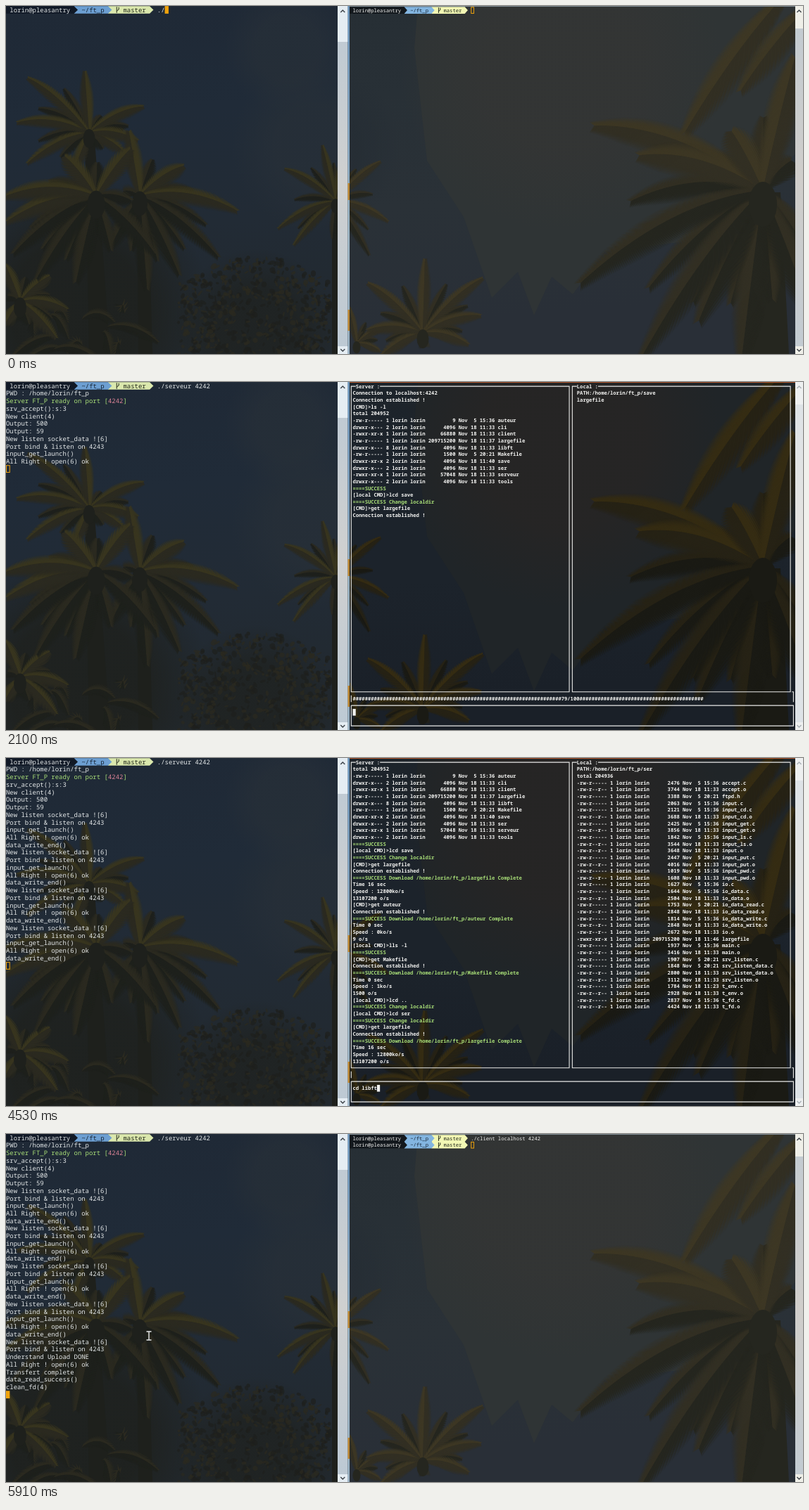
Animation, 1132 px wide and 495 px high, one loop 5.94 s. Source, as an HTML page with a canvas:

```html
<!DOCTYPE html>
<html lang="en">
<head>
<meta charset="utf-8">
<title>ft_p session</title>
<style>
html, body { margin: 0; width: 100%; height: 100%; overflow: hidden; background: #20282f; }
canvas { display: block; width: 1132px; height: 495px; }
</style>
</head>
<body>
<canvas id="stage" width="1132" height="495"></canvas>
<script>
const W = 1132, H = 495, LOOP = 5940, SPLIT = 488;
const USER = 'lorin', HOST = 'pleasantry', HOME = `/home/${USER}/ft_p`;
const GREEN = '#a9df78', ORANGE = '#f0a30c', PALE = '#e4e8e9', WHITE = '#f4f4f2';
const ctx = document.getElementById('stage').getContext('2d');

// ---------- scenery ----------

function rng(seed) {
  return () => (seed = (seed * 16807) % 2147483647) / 2147483647;
}

function frond(g, [upper, lower], x, y, tx, ty, lift, w) {
  const cx = (x + tx) / 2, cy = (y + ty) / 2 - lift;
  const n = Math.ceil(Math.hypot(tx - x, ty - y) / 2);
  for (let i = 1; i <= n; i++) {
    const t = i / n, u = 1 - t;
    const px = u * u * x + 2 * u * t * cx + t * t * tx;
    const py = u * u * y + 2 * u * t * cy + t * t * ty;
    const dx = u * (cx - x) + t * (tx - cx), dy = u * (cy - y) + t * (ty - cy);
    const a = Math.atan2(dy, dx), len = w * (0.3 + 0.7 * Math.sin(Math.PI * Math.pow(t, 0.85)));
    const ox = Math.cos(a) * 2.4, oy = Math.sin(a) * 2.4;
    for (const s of [-1, 1]) {
      const b = a + s * 0.7;
      g.fillStyle = s * dx < 0 ? upper : lower;
      g.beginPath();
      g.moveTo(px - ox, py - oy);
      g.lineTo(px + ox, py + oy);
      g.lineTo(px + Math.cos(b) * len, py + Math.sin(b) * len + len * 0.2);
      g.fill();
    }
  }
}

// tips run around the crown; shorter shaded fronds fill the gaps between them
function palm(g, pal, x, y, w, tips) {
  const shade = [pal.mid, pal.dark], sun = [pal.light, pal.mid];
  const n = tips.length;
  const lift = tx => Math.abs(tx - x) * 0.2;
  for (let i = 0; i < n; i += 2) {
    const mx = (tips[i] + tips[(i + 2) % n]) / 2, my = (tips[i + 1] + tips[(i + 3) % n]) / 2;
    const tx = x + (mx - x) * 0.75, ty = y + (my - y) * 0.75;
    frond(g, shade, x, y, tx, ty, lift(tx), w * 0.8);
  }
  for (let i = 0; i < n; i += 2) {
    const [tx, ty] = [tips[i], tips[i + 1]];
    frond(g, ty > y + 60 ? shade : sun, x, y, tx, ty, lift(tx), w);
  }
  g.fillStyle = pal.dark;
  g.beginPath();
  g.ellipse(x, y + w * 0.5, w * 0.5, w * 0.8, 0, 0, 7);
  g.fill();
}

function glow(g, x, y, r, color) {
  const grad = g.createRadialGradient(x, y, 0, x, y, r);
  grad.addColorStop(0, color);
  grad.addColorStop(0.5, color);
  grad.addColorStop(1, color.slice(0, 7) + '00');
  g.fillStyle = grad;
  g.fillRect(x - r, y - r, 2 * r, 2 * r);
}

function shape(g, color, points) {
  g.fillStyle = color;
  g.beginPath();
  for (let i = 0; i < points.length; i += 2) g.lineTo(points[i], points[i + 1]);
  g.fill();
}

function scene(pal) {
  const c = document.createElement('canvas');
  c.width = W;
  c.height = H;
  const g = c.getContext('2d'), rand = rng(42);
  const sky = g.createLinearGradient(0, 0, 40, H);
  pal.sky.forEach((col, i) => sky.addColorStop(i / (pal.sky.length - 1), col));
  g.fillStyle = sky;
  g.fillRect(0, 0, W, H);
  shape(g, pal.cloud, [585, 0, 580, 60, 598, 220, 650, 300, 690, 415, 727, 378, 750, 440, 775, 385,
    805, 410, 850, 350, 1000, 330, W, 200, W, 0]);
  glow(g, 790, 90, 230, pal.glow);
  glow(g, 400, 60, 90, pal.haze);
  glow(g, 440, 200, 120, pal.haze);

  // undergrowth and far trees
  glow(g, 100, 430, 190, pal.dark + 'd0');
  glow(g, 355, 460, 115, pal.dark + 'a0');
  for (let i = 0; i < 620; i++) {
    const x = 245 + rand() * 215, top = 395 - 40 * Math.sin((x - 245) / 70);
    const y = top + rand() * (500 - top);
    g.fillStyle = rand() < 0.5 ? pal.mid : pal.dark;
    g.globalAlpha = 0.7;
    g.beginPath();
    g.ellipse(x, y, 1 + rand() * 4, 1 + rand() * 3, rand() * 3, 0, 7);
    g.fill();
  }
  g.globalAlpha = 1;

  // trunks
  shape(g, pal.dark, [463, 285, 471, 285, 471, H, 463, H]);
  shape(g, pal.dark, [1062, 265, 1100, 265, 1112, H, 1050, H]);
  shape(g, pal.dark, [112, 190, 126, 190, 148, H, 118, H]);
  shape(g, pal.dark, [186, 280, 202, 280, 208, H, 188, H]);

  for (let i = 0; i < 14; i++) {
    const x = rand() * 230, y = 400 + rand() * 90;
    frond(g, [pal.mid, pal.dark], x, y, x + (rand() - 0.5) * 150, y + rand() * 50 - 15, 20, 15);
  }
  palm(g, pal, 20, 420, 18, [0, 370, 60, 385, 85, 430, 70, 470, 0, 450]);
  palm(g, pal, 118, 180, 17, [112, 95, 165, 205, 193, 143, 185, 190, 100, 225, 32, 222, 18, 165, 33, 103]);
  palm(g, pal, 190, 270, 22, [175, 180, 250, 228, 326, 290, 300, 355, 245, 380, 200, 400, 150, 340]);
  palm(g, pal, 128, 270, 25, [85, 215, 175, 205, 210, 350, 100, 390, 45, 385, 12, 350, 3, 305, 0, 270]);
  palm(g, pal, 468, 278, 13, [450, 200, 480, 215, 530, 222, 541, 305, 515, 352, 410, 338, 388, 315, 398, 232]);
  palm(g, pal, 498, 480, 11, [488, 430, 540, 455, 530, 490]);
  palm(g, pal, 592, 465, 17, [595, 362, 675, 388, 672, 440, 655, 480, 535, 495, 515, 460, 516, 395]);
  frond(g, [pal.light, pal.mid], 1110, -20, 965, 178, 22, 40);
  frond(g, [pal.light, pal.mid], 1150, -10, 1045, 118, 15, 34);
  palm(g, pal, 1075, 262, 40, [838, 170, 902, 212, 1032, 180, 1120, 75, 1132, 340, 1140, 430,
    1045, 500, 985, 445, 905, 495, 818, 392]);
  return c;
}

const leftView = scene({
  sky: ['#1f2936', '#202b38', '#222b35', '#22292f'], cloud: '#222b35',
  light: '#38351f', mid: '#2b2a20', dark: '#1e201c', glow: '#262e35ff', haze: '#283038a0'
});
const idleView = scene({
  sky: ['#262e34', '#283036', '#2a3137', '#292f37'], cloud: '#2f3435',
  light: '#3d3724', mid: '#322f23', dark: '#25261f', glow: '#343534c0', haze: '#232b3380'
});
const activeView = scene({
  sky: ['#1d242a', '#1c232b', '#1c232b', '#1a2028'], cloud: '#202528',
  light: '#352c13', mid: '#262215', dark: '#1a1a14', glow: '#272524d0', haze: '#1c232c80'
});

// ---------- directory listings ----------

const pad = (s, n) => String(s).padStart(n);
const entry = (perm, links, size, day, time, name) =>
  `${perm} ${links} ${USER} ${USER} ${pad(size, 9)} Nov ${pad(day, 2)} ${time} ${name}`;

const FILE = '-rw-r-----', DIR = 'drwxr-x---', OPEN = 'drwxr-xr-x', EXE = '-rwxr-xr-x';
const rootList = saved => [
  'total 204952',
  entry(FILE, 1, 9, 5, '15:36', 'auteur'),
  entry(DIR, 2, 4096, 18, '11:33', 'cli'),
  entry(EXE, 1, 66880, 18, '11:33', 'client'),
  entry(FILE, 1, 209715200, 18, '11:37', 'largefile'),
  entry(DIR, 8, 4096, 18, '11:33', 'libft'),
  entry(FILE, 1, 1500, 5, '20:21', 'Makefile'),
  entry(OPEN, 2, 4096, 18, saved, 'save'),
  entry(DIR, 2, 4096, 18, '11:33', 'ser'),
  entry(EXE, 1, 57048, 18, '11:33', 'serveur'),
  entry(DIR, 2, 4096, 18, '11:33', 'tools')
];
const names = rootList('').slice(1).map(l => l.split(' ').pop());

const saveList = more => [
  'total 204804',
  entry(EXE, 1, 9, 18, '11:45', 'auteur'),
  entry(EXE, 1, 209715200, 18, '11:45', 'largefile')
].concat(more ? entry(EXE, 1, 1500, 18, '11:45', 'Makefile') : []);

// objects default to 18 11:33, sources to 5 15:36
const SER = `accept.c 2476,accept.o 3744,ftpd.h 3388 5 20:21,input.c 2063,input_cd.c 2121,
input_cd.o 3688,input_get.c 2425,input_get.o 3856,input_ls.c 1842,input_ls.o 3544,input.o 3648,
input_put.c 2447 5 20:21,input_put.o 4016,input_pwd.c 1019,input_pwd.o 1608,io.c 1627,
io_data.c 1644,io_data.o 2504,io_data_read.c 1753 5 20:21,io_data_read.o 2848,
io_data_write.c 1814,io_data_write.o 2848,io.o 2672,largefile 209715200 18 11:46,main.c 1937,
main.o 3416,srv_listen.c 1907 5 20:21,srv_listen_data.c 1848 5 20:21,srv_listen_data.o 2800,
srv_listen.o 3112,t_env.c 1784 18 11:23,t_env.o 2928,t_fd.c 2837,t_fd.o 4424`;
const serFiles = SER.split(/,\s*/).map(row => {
  const [name, size, day, time] = row.split(' '), obj = name.endsWith('.o');
  const perm = obj ? '-rw-r--r--' : name === 'largefile' ? EXE : FILE;
  return entry(perm, 1, size, day || (obj ? 18 : 5), time || (obj ? '11:33' : '15:36'), name);
});
const serList = full => full
  ? ['total 204936', ...serFiles]
  : ['total 136', ...serFiles.filter(l => !l.endsWith('largefile'))];

// ---------- session script ----------

const events = [];
const at = (t, run) => events.push([t, run]);
const type = (field, ...keys) => keys.forEach(([t, text]) => at(t, s => { s[field] = text; }));
const local = (s, dir, list) => { s.local = [`PATH:${HOME}${dir}`, ...list]; };
const enter = (s, ...lines) => { s.input = ''; s.log.push(...lines); };

function openData(s, launch) {
  s.left.push('New listen socket_data ![6]', 'Port bind & listen on 4243', launch, 'All Right ! open(6) ok');
}
function getStart(s, name) {
  enter(s, `[CMD]>get ${name}`, 'Connection established !');
  openData(s, 'input_get_launch()');
}
function getEnd(s, name, secs, speed, rate) {
  s.left.push('data_write_end()');
  s.log.push(`====SUCCESS Download ${HOME}/${name} Complete`, `Time ${secs} sec`,
    `Speed : ${speed}ko/s`, `${rate} o/s`);
}

type('shell', [60, './se'], [90, './serveur'], [120, './serveur '], [150, './serveur 4'],
  [180, './serveur 42'], [210, './serveur 424'], [240, './serveur 4242']);
at(270, s => s.left.push(`PWD : ${HOME}`, 'Server FT_P ready on port [4242]'));
at(300, s => { s.focus = true; });
type('cmd', [330, './'], [360, './client '], [390, './client l'], [420, './client local'],
  [450, './client localhost '], [480, './client localhost 42'], [510, './client localhost 424'],
  [540, './client localhost 4242']);
at(570, s => {
  s.ui = true;
  s.left.push('srv_accept():s:3', 'New client(4)');
  s.log.push('Connection to localhost:4242', 'Connection established !');
  local(s, '', names);
});

type('input', [660, 'l'], [690, 'ls -l']);
at(750, s => {
  enter(s, '[CMD]>ls -l', ...rootList('11:40'), '====SUCCESS');
  s.left.push('Output: 500', 'Output: 59');
});
type('input', [900, 'l'], [960, 'lcd s'], [1050, 'lcd save']);
at(1110, s => {
  enter(s, '[local CMD]>lcd save', '====SUCCESS Change localdir');
  local(s, '/save', []);
});
type('input', [1290, 'get'], [1320, 'get l'], [1350, 'get largefile']);
at(1380, s => { getStart(s, 'largefile'); local(s, '/save', ['largefile']); });
at(2310, s => getEnd(s, 'largefile', 16, 12800, 13107200));

type('input', [2340, 'get'], [2370, 'get a'], [2400, 'get auteur']);
at(2490, s => {
  getStart(s, 'auteur');
  getEnd(s, 'auteur', 0, 0, 9);
  local(s, '/save', ['auteur', 'largefile']);
});
type('input', [2520, 'lls -l']);
at(2580, s => {
  enter(s, '[local CMD]>lls -l', '====SUCCESS');
  local(s, '/save', saveList(false));
});
type('input', [2640, 'get'], [2670, 'get M'], [2700, 'get Makefile']);
at(2730, s => {
  getStart(s, 'Makefile');
  getEnd(s, 'Makefile', 0, 1, 1500);
  local(s, '/save', saveList(true));
});
type('input', [2940, 'lc'], [2970, 'lcd ..']);
at(3030, s => {
  enter(s, '[local CMD]>lcd ..', '====SUCCESS Change localdir');
  local(s, '', rootList('11:45'));
});
type('input', [3150, 'l'], [3300, 'lcd'], [3330, 'lcd ser']);
at(3360, s => {
  enter(s, '[local CMD]>lcd ser', '====SUCCESS Change localdir');
  local(s, '/ser', serList(false));
});
type('input', [3420, 'get'], [3450, 'get l'], [3480, 'get largefile']);
at(3510, s => { getStart(s, 'largefile'); local(s, '/ser', serList(true)); });
at(4410, s => getEnd(s, 'largefile', 16, 12800, 13107200));

type('input', [4440, 'cd'], [4470, 'cd l'], [4500, 'cd lib'], [4530, 'cd libft']);
at(4560, s => enter(s, '[CMD]>cd libft', 'cd libft', `new path : ${HOME}/libft`, '====SUCCESS'));
type('input', [4590, 'put'], [4620, 'put l'], [4650, 'put largefile']);
at(4680, s => {
  enter(s, '[CMD]>put largefile', '[CMD]>put largefile:209715200', 'Connection established !');
  openData(s, 'Understand Upload DONE');
});
at(5670, s => {
  s.left.push('Transfert complete', 'data_read_success()');
  s.log.push('====SUCCESS Upload largefile Complete', 'Time 16 sec', 'Speed : 12800ko/s', '13107200 o/s');
});
type('input', [5760, 'qu'], [5790, 'quit']);
at(5850, s => { s.ui = false; s.done = true; });
at(5880, s => s.left.push('clean_fd(4)'));
at(5910, s => { s.focus = false; });

// transfers as time/percent pairs
const transfers = [
  [[1380, 0], [2100, 79.2], [2310, 101]],
  [[3510, 0], [4410, 100]],
  [[4680, 0], [5070, 50], [5400, 77.2], [5670, 100]]
];
function progress(t) {
  t = Math.floor(t / 30) * 30;
  for (const keys of transfers) {
    for (let i = 1; i < keys.length; i++) {
      const [t0, p0] = keys[i - 1], [t1, p1] = keys[i];
      if (t >= t0 && t < t1) return Math.floor(p0 + (p1 - p0) * (t - t0) / (t1 - t0));
    }
  }
  return -1;
}

function stateAt(t) {
  const s = { left: [], log: [], local: [], input: '', shell: './', cmd: '', focus: false, ui: false, done: false };
  for (const [when, run] of events) if (when <= t) run(s);
  return s;
}

// ---------- terminals ----------

const mono = '"Noto Sans Mono", "DejaVu Sans Mono", monospace';
const A = { x: 0, mid: 5.5, cw: 5.37, rh: 10.74, font: `500 8.95px ${mono}`, base: 3.1,
  segs: ['#111926', '#6d9fd2', '#dbe8ad'], text: PALE };
const B = { x: 488.15, mid: 6.1, cw: 4.302, rh: 9.66, font: `bold 7.17px ${mono}`, base: 2.5,
  segs: ['#13181d', '#83b5e0', '#f2f7b4'], text: WHITE };
const S = { ...B, font: `500 7.17px ${mono}` };
const colX = (p, c) => p.x + c * p.cw;
const rowY = (p, r) => p.mid + r * p.rh;

function put(p, c, r, text, color = p.text) {
  ctx.font = p.font;
  ctx.fillStyle = color;
  ctx.fillText(text, colX(p, c), rowY(p, r) + p.base);
}

function cursor(p, c, r, color, solid) {
  const x = colX(p, c), y = rowY(p, r) - p.rh / 2;
  ctx.fillStyle = ctx.strokeStyle = color;
  ctx.lineWidth = 1;
  if (solid) ctx.fillRect(x, y, p.cw, p.rh);
  else ctx.strokeRect(x + 0.5, y + 0.5, p.cw - 0.6, p.rh - 1);
}

function prompt(p, r, text) {
  const y = rowY(p, r) - p.rh / 2, ends = [18, 27, 38];
  for (let i = 2; i >= 0; i--) {
    const x0 = i ? colX(p, ends[i - 1]) : p.x, x = colX(p, ends[i]);
    shape(ctx, p.segs[i], [x0, y, x, y, x + p.cw, y + p.rh / 2, x, y + p.rh, x0, y + p.rh]);
  }
  put(p, 1, r, `${USER}@${HOST}`);
  put(p, 20, r, '~/ft_p', '#172434');
  put(p, 31, r, 'master', '#20261a');
  put(p, 40, r, text);
  const x = colX(p, 29) + 1.5, h = p.rh;
  ctx.strokeStyle = '#20261a';
  ctx.lineWidth = 1;
  ctx.beginPath();
  ctx.moveTo(x, y + h * 0.1);
  ctx.lineTo(x, y + h * 0.9);
  ctx.moveTo(x, y + h * 0.65);
  ctx.lineTo(x + p.cw * 0.55, y + h * 0.45);
  ctx.lineTo(x + p.cw * 0.55, y + h * 0.15);
  ctx.stroke();
}

function fillDown(x, w, colors) {
  const grad = ctx.createLinearGradient(0, 0, 0, H);
  colors.forEach((col, i) => grad.addColorStop(i / (colors.length - 1), col));
  ctx.fillStyle = grad;
  ctx.fillRect(x, 0, w, H);
}

function chevron(x, y, dir, color) {
  ctx.strokeStyle = color;
  ctx.lineWidth = 1.4;
  ctx.beginPath();
  ctx.moveTo(x - 3, y + 1.5 * dir);
  ctx.lineTo(x, y - 1.5 * dir);
  ctx.lineTo(x + 3, y + 1.5 * dir);
  ctx.stroke();
}

function scrollbar(x, w, thumb, [bright, edge, middle], mark) {
  fillDown(x, w, [edge, middle, edge]);
  ctx.fillStyle = bright;
  ctx.fillRect(x, 0, w, thumb);
  ctx.fillRect(x, 484, w, 11);
  chevron(x + w / 2, 7.5, 1, mark);
  chevron(x + w / 2, 489.5, -1, mark);
}

// the bare wallpaper shows in the gap between the windows
function gap() {
  fillDown(485.5, 2.5, ['#6c96bd', '#84a8c6', '#a3bccb', '#9db6c8']);
  ctx.fillStyle = '#c08a35';
  ctx.fillRect(485.5, 252, 2.5, 24);
  ctx.fillRect(485.5, 432, 2.5, 30);
}

// box through cell centres, with a gap for its title
function box(c0, r0, c1, r1, title = '') {
  const x = c => colX(B, c + 0.5), y = r => rowY(B, r);
  const start = title ? colX(B, c0 + 2) : x(c0);
  ctx.strokeStyle = '#e9e9e7';
  ctx.lineWidth = 1.1;
  ctx.beginPath();
  ctx.moveTo(start + title.length * B.cw, y(r0));
  ctx.lineTo(x(c1), y(r0));
  ctx.lineTo(x(c1), y(r1));
  ctx.lineTo(x(c0), y(r1));
  ctx.lineTo(x(c0), y(r0));
  ctx.lineTo(start, y(r0));
  ctx.stroke();
  put(B, c0 + 2, r0, title);
}

function drawLeft(s) {
  prompt(A, 0, s.shell);
  s.left.forEach((line, i) => {
    if (i !== 1) return put(A, 0, i + 1, line);
    const cut = line.indexOf('4242');
    put(A, 0, 2, line.slice(0, cut), GREEN);
    put(A, cut, 2, '4242', '#dd8497');
    put(A, cut + 4, 2, ']', GREEN);
  });
  const running = s.left.length > 0;
  cursor(A, running ? 0 : 40 + s.shell.length, running ? s.left.length + 1 : 0, ORANGE, !s.focus);
}

function drawShell(s) {
  prompt(S, 0, s.cmd);
  if (s.done) prompt(S, 1, '');
  cursor(S, s.done ? 40 : 40 + s.cmd.length, s.done ? 1 : 0, ORANGE, s.focus);
}

function drawClient(s, t) {
  box(0, 0, 72, 45, 'Server :');
  box(73, 0, 145, 45, 'Local :');
  box(0, 47, 146, 50);
  const l = colX(B, 0.5), r = colX(B, 146.5), y = rowY(B, 46);
  ctx.beginPath();
  ctx.moveTo(l, y - B.rh / 2);
  ctx.lineTo(l, y + B.rh / 2);
  ctx.moveTo(r - B.cw / 2, y - B.rh);
  ctx.lineTo(r, y - B.rh);
  ctx.lineTo(r, y + B.rh / 2);
  ctx.stroke();

  s.log.slice(-44).forEach((line, i) => put(B, 1, i + 1, line, line.startsWith('====') ? GREEN : WHITE));
  s.local.forEach((line, i) => put(B, 75, i + 1, line));

  const p = progress(t);
  if (p >= 0) {
    const bar = '#'.repeat(Math.min(145, Math.floor(p * 1.47))).padEnd(145), label = `${p}/100`;
    put(B, 1, 46, bar.slice(0, 69) + label + bar.slice(69 + label.length));
  }
  put(B, 1, 48, s.input);
  cursor(B, 1 + s.input.length, 48, '#f0f0ee', true);
}

function drawPointer(x, y) {
  ctx.strokeStyle = '#e6e8ea';
  ctx.lineWidth = 1.4;
  ctx.beginPath();
  ctx.moveTo(x - 3.5, y - 6);
  ctx.lineTo(x + 3.5, y - 6);
  ctx.moveTo(x, y - 6);
  ctx.lineTo(x, y + 6);
  ctx.moveTo(x - 3.5, y + 6);
  ctx.lineTo(x + 3.5, y + 6);
  ctx.stroke();
}

function draw(t) {
  const s = stateAt(t);
  ctx.drawImage(leftView, 0, 0);
  ctx.drawImage(s.focus ? activeView : idleView, SPLIT, 0, W - SPLIT, H, SPLIT, 0, W - SPLIT, H);

  scrollbar(471, 14.5, 51, ['#e5edf3', '#bcc9d4', '#cfd0d0'], '#3a4046');
  gap();
  ctx.fillStyle = s.focus ? '#b0562c' : '#7f8b93';
  ctx.fillRect(SPLIT, 0, W - SPLIT, 1);
  if (s.focus) scrollbar(1121, 11, 32, ['#eef0f0', '#dde3e8', '#e5e3df'], '#a9b0b6');
  else scrollbar(1121, 11, 32, ['#efefe8', '#c2cbd2', '#d0cecb'], '#3a4046');

  drawLeft(s);
  if (s.ui) drawClient(s, t);
  else drawShell(s);
  if (t >= 5910) drawPointer(203, 287);
}

ctx.textBaseline = 'alphabetic';
ctx.textRendering = 'geometricPrecision';

function tick() {
  draw(performance.now() % LOOP);
  requestAnimationFrame(tick);
}
tick();
</script>
</body>
</html>
```
